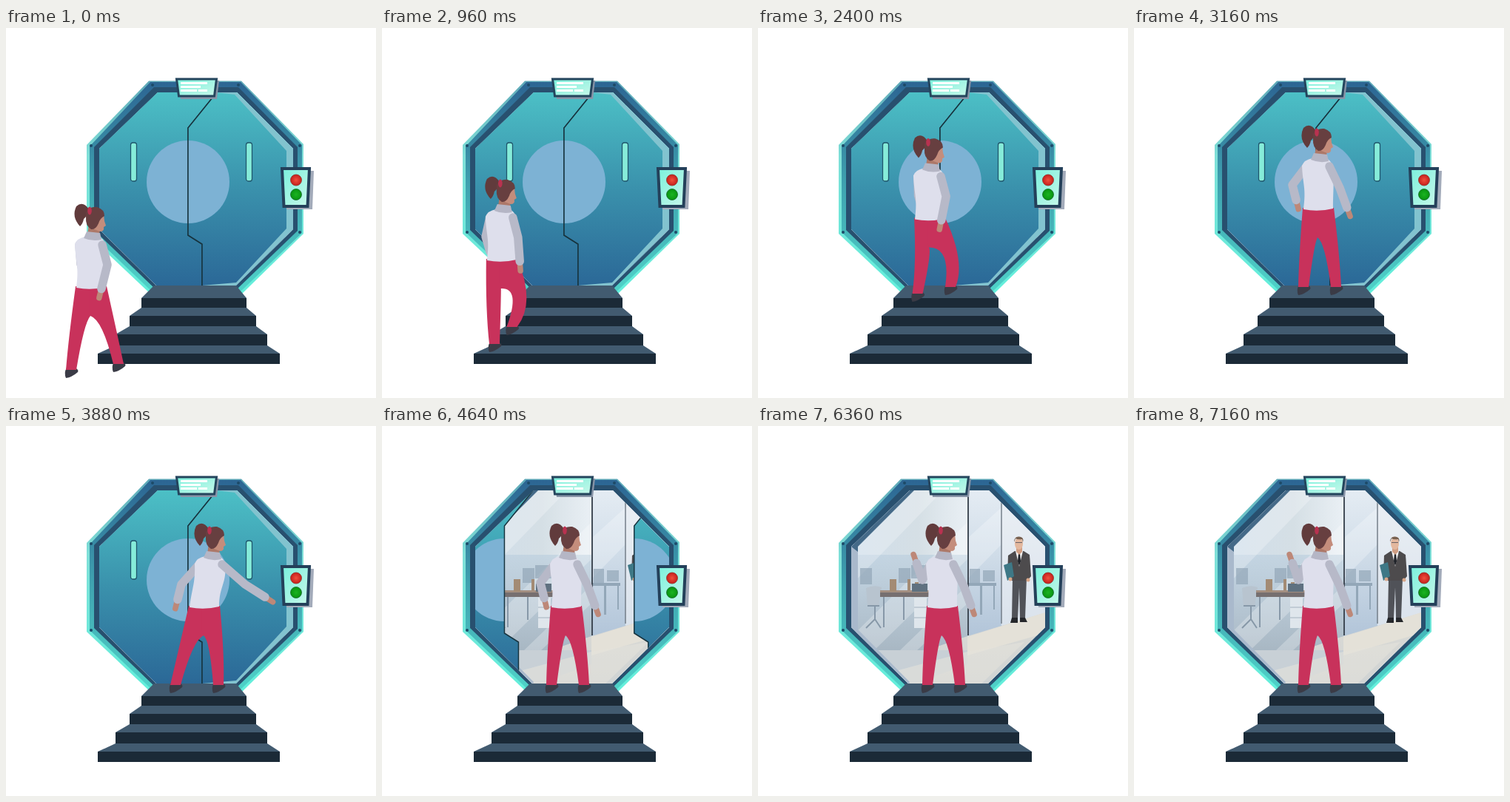
Recreate the animation shown at these times as an HTML page. Size 500 by 500 pixels, loop 7.2 s.

```html
<!DOCTYPE html>
<html lang="en">
<head>
<meta charset="utf-8">
<title>Office portal</title>
<style>
html, body { margin: 0; width: 100%; height: 100%; overflow: hidden; background: #fff; }
svg { display: block; width: 100%; height: 100%; }
</style>
</head>
<body>
<svg viewBox="0 0 500 500">
  <defs>
    <linearGradient id="doorFill" gradientUnits="userSpaceOnUse" x1="0" y1="86" x2="0" y2="348">
      <stop offset="0" stop-color="#4cc0c6"/><stop offset=".5" stop-color="#3a91ac"/><stop offset="1" stop-color="#2b6897"/>
    </linearGradient>
    <linearGradient id="rim" x1="0" y1="0" x2="0" y2="1">
      <stop offset="0" stop-color="#5fa9b8"/><stop offset=".35" stop-color="#7fe0d8"/><stop offset="1" stop-color="#62efdb"/>
    </linearGradient>
    <linearGradient id="band" x1="0" y1="0" x2="0" y2="1">
      <stop offset="0" stop-color="#2c6593"/><stop offset=".5" stop-color="#3fa3b0"/><stop offset="1" stop-color="#4fd2c8"/>
    </linearGradient>
    <linearGradient id="glow" x1="0" y1="0" x2="1" y2="1">
      <stop offset="0" stop-color="#7af0dc"/><stop offset="1" stop-color="#c9f8ea"/>
    </linearGradient>
    <linearGradient id="wall" x1="0" y1="0" x2="1" y2="0">
      <stop offset="0" stop-color="#cfdeeb"/><stop offset=".35" stop-color="#d5dfe5"/><stop offset=".6" stop-color="#eaf0f5"/>
    </linearGradient>
    <linearGradient id="haze" x1="0" y1="0" x2="0" y2="1">
      <stop offset="0" stop-color="#bdd0df" stop-opacity=".7"/><stop offset="1" stop-color="#a8b7c3"/>
    </linearGradient>
    <linearGradient id="glass" x1="0" y1="0" x2="0" y2="1">
      <stop offset="0" stop-color="#e6edf4"/><stop offset=".4" stop-color="#d3dfea"/><stop offset="1" stop-color="#b2c5d9"/>
    </linearGradient>
    <linearGradient id="floor" x1="0" y1="0" x2="0" y2="1">
      <stop offset="0" stop-color="#dcdbd5"/><stop offset="1" stop-color="#cfd3d4"/>
    </linearGradient>
    <radialGradient id="red"><stop offset="0" stop-color="#f0503c"/><stop offset="1" stop-color="#c61f1c"/></radialGradient>
    <radialGradient id="green"><stop offset="0" stop-color="#1bb422"/><stop offset="1" stop-color="#089410"/></radialGradient>
    <clipPath id="opening"><path d="M205 87H312L388 163V272L311 348H203L126 272V163Z"/></clipPath>
    <path id="seam" d="M290 80L284 88L246 135V280L265 292V355" fill="none" stroke="#17343f" stroke-width="1.5"/>
    <rect id="slot" y="155" width="8" height="52" rx="3" fill="#86ecd9" stroke="#1f566c" stroke-width="1.3"/>
    <path id="shoe" d="M-6-3L5-3Q11 0 9 3Q1 10-7 11Q-10 4-6-3Z" fill="#3a3b46"/>
    <path id="bolts" d="M198 77h0M115 159h0M115 276h0M314 77h0M397 159h0M397 276h0"/>
  </defs>

  <!-- portal frame -->
  <path d="M193 71.5H318L402 157V278L318 360H196L109 278V158Z" fill="url(#rim)"/>
  <path d="M195 73H317L400 158V277L316 357H198L113 276V160Z" fill="url(#band)"/>
  <path d="M200 80H314L394 161V274L313 352H201L119 273V161Z" fill="#28506f"/>
  <use href="#bolts" stroke="#1d4a68" stroke-width="4" stroke-linecap="round"/>

  <g clip-path="url(#opening)">
    <!-- office -->
    <rect x="120" y="80" width="275" height="275" fill="url(#wall)"/>
    <path d="M283 80H395V262L283 284Z" fill="url(#glass)"/>
    <path d="M329 80H395V262L329 270Z" fill="#eef2f6" opacity=".65"/>
    <rect x="126" y="174" width="157" height="130" fill="url(#haze)"/>
    <path d="M126 303H228L283 284L395 250V355H126Z" fill="url(#floor)"/>
    <path d="M126 303H283V322L205 350H126Z" fill="#c8d0d6"/>
    <path d="M283 285L388 252V280L283 310Z" fill="#e4e1d8"/>
    <path d="M190 330L283 305L360 292L300 350H190Z" fill="#e5e3dd" opacity=".6"/>
    <path d="M205 87H250L126 215V165ZM283 130V180L150 310H126V285ZM283 215V240L215 303H192ZM329 110V160L285 205V150Z" fill="#fff" opacity=".25"/>
    <g fill="#93a7b8">
      <path d="M138 192H154V214H138ZM190 192H206V212H190ZM207 188H229V206H207ZM286 193H300V212H286ZM304 195H320V210H304Z" opacity=".7"/>
      <path d="M284 212H322V216H284ZM300 216H303V255H300ZM318 216H320V248H318Z"/>
    </g>
    <path d="M146 219Q157 214 167 218L163 244H148Z" fill="#b8c4cf"/>
    <path d="M148 243H164M158 244V262M146 273L158 261L166 273M170 231V272M197 231V262" fill="none" stroke="#8798a8" stroke-width="2"/>
    <path d="M165 222H236V231H165Z" fill="#766f70"/>
    <path d="M165 222H236V225H165Z" fill="#a38f82"/>
    <path d="M178 207H187V224H178ZM202 207H206V222H202ZM212 211H217V222H212Z" fill="#a38b74"/>
    <path d="M208 213H229V224H208Z" fill="#5f7180"/>
    <path d="M211 232H228V273H211Z" fill="#dfe6ec"/>
    <path d="M211 245H228M211 259H228" stroke="#a4b2bf"/>
    <path d="M284 86V283" stroke="#343d48" stroke-width="1.8"/>
    <path d="M329 100V267" stroke="#6d7782" stroke-width="1.4"/>
    <path d="M126 155L135 163V275L205 346L203 350L126 274Z" fill="#a9b9cc"/>
    <path d="M126 163L205 87H211L135 163V170Z" fill="#456a88"/>

    <!-- colleague -->
    <path d="M344 205H363L361 260H354L353 218L351 260H343Z" fill="#505258"/>
    <path d="M343 259H351V266H341ZM354 259H361L364 265H354Z" fill="#25272b"/>
    <path d="M347 169L359 169L367 174L369 203L364 209H342L337 204L338 175Z" fill="#4d4b4d"/>
    <path d="M348 169H358L353 190Z" fill="#f4f4f4"/>
    <path d="M352 172H354L355 183L353 189L351 183Z" fill="#202329"/>
    <path d="M349 163H357V170L353 174L349 170Z" fill="#d09e83"/>
    <ellipse cx="352.5" cy="159" rx="5.5" ry="8" fill="#e3b89e"/>
    <path d="M346 157Q346 149 353 149.500Q360 150 358 157L357 153Q351 154 348 152Z" fill="#77604f"/>
    <path d="M348 157.500H357" stroke="#5d5a60" stroke-width=".9"/>
    <path d="M332 188L343 184L346 203L337 209Z" fill="#3e7886"/>
    <path d="M341 207h0M365 208h0" stroke="#d8a78a" stroke-width="5" stroke-linecap="round"/>

    <!-- sliding doors -->
    <g id="leftDoor">
      <path d="M90 80H290L284 88L246 135V280L265 292V355H90Z" fill="url(#doorFill)"/>
      <path d="M246 152A56 56 0 0 0 246 264Z" fill="#7db2d4"/>
      <use href="#slot" x="168.5"/>
      <use href="#seam"/>
    </g>
    <g id="rightDoor">
      <path d="M290 80L284 88L246 135V280L265 292V355H420V80Z" fill="url(#doorFill)"/>
      <path d="M246 152A56 56 0 0 1 246 264Z" fill="#7db2d4"/>
      <use href="#slot" x="324.5"/>
      <path d="M284 87H312L388 163V272L311 348H265L311 344L379 271V166L309 90Z" fill="#82c3cf"/>
      <use href="#seam"/>
    </g>
  </g>

  <!-- sign -->
  <path d="M233 71H288L285 96H236Z" fill="#8894a7"/>
  <path d="M230.5 69H284.500L281.500 92H233.500Z" fill="url(#glow)" stroke="#24455d" stroke-width="3"/>
  <path d="M236 74.500H272M236 79.500H263M236 84.500H258M260 84.500H272" stroke="#fff" stroke-width="3"/>

  <!-- control panel -->
  <path d="M377 193H416L414 245H379Z" fill="#a3abba"/>
  <path d="M373 190H410L407.500 241H375.500Z" fill="url(#glow)" stroke="#24405a" stroke-width="4"/>
  <circle cx="392" cy="205.500" r="7.500" fill="url(#red)" stroke="#8e3028" stroke-width=".8"/>
  <circle cx="392" cy="225" r="7.500" fill="url(#green)" stroke="#17682c" stroke-width=".8"/>

  <!-- stairs -->
  <path d="M200 348H311L325 365H183ZM183 378H325L338 389H167ZM167 403H338L353 414H148ZM148 429H353L370 440H124Z" fill="#425b70"/>
  <path d="M183 365H325V378H183ZM167 389H338V403H167ZM148 414H353V429H148ZM124 440H370V454H124Z" fill="#1b2a37"/>

  <!-- visitor -->
  <g stroke-linecap="round" stroke-linejoin="round">
    <path id="leftHand" stroke="#bd8878" stroke-width="7.5"/>
    <path id="leftArm" fill="none" stroke="#b7b9c8" stroke-width="11.5"/>
    <use id="leftShoe" href="#shoe"/>
    <use id="rightShoe" href="#shoe"/>
    <path id="leftLeg" fill="#c8325b"/>
    <path id="rightLeg" fill="#c8325b"/>
    <path id="torso" fill="#dedfec"/>
    <path id="rightHand" stroke="#bd8878" stroke-width="7.5"/>
    <path id="rightArm" fill="none" stroke="#b7b9c8" stroke-width="11.5"/>
    <g id="head">
      <path d="M-5-13L10-9L9 3L-7 1Z" fill="#ad7868"/>
      <path d="M-8-3L10-1L12 8Q0 11-12 6Z" fill="#b5b6c5"/>
      <path d="M3-24L15-26L16-17L18-11L15-9Q16-3 10-3L2-6Z" fill="#c48d7c"/>
      <path d="M-5-33Q-13-45-22-37Q-29-23-17-10Q-13-14-12-20Q-7-24-5-33Z" fill="#613b3c"/>
      <path d="M-9-29Q-4-37 6-36Q16-33 16-24Q10-21 8-14Q4-5-2-6Q-10-11-9-22Z" fill="#673f40"/>
      <ellipse cx="-4" cy="-31" rx="2.800" ry="5.500" fill="#b93250"/>
    </g>
  </g>
</svg>
<script>
const LOOP = 7200;
const STRIDE = 1080;   // one step of each foot
const SWING = 460;     // time a foot spends in the air
const WALK = 2750;

// Where each foot lands on the way up.
const footholds = {
  left: [[88, 462], [152, 427], [200, 378], [229, 350]],
  right: [[152, 454], [176, 404], [260, 350], [273, 350]]
};

// Elbow and wrist, measured from the neck.
const poses = {
  left: { walk: [-20, 41, -13, 65], stand: [-37, 40, -31, 64], reach: [-42, 42, -48, 66], wave: [-29, 36, -38, 10] },
  right: { walk: [20, 42, 17, 78], stand: [27, 44, 38, 74], reach: [44, 42, 74, 61] }
};

const $ = id => document.getElementById(id);
const ramp = (t, from, length) => Math.max(0, Math.min(1, (t - from) / length));
const ease = u => u * u * (3 - 2 * u);
const mix = (a, b, u) => a.map((v, i) => v + (b[i] - v) * u);
const move = (id, x, y) => $(id).setAttribute('transform', `translate(${x} ${y})`);
const trace = (id, d) => $(id).setAttribute('d', d);

function footAt(side, t) {
  const steps = footholds[side];
  const clock = t - (side === 'right' ? STRIDE / 2 : 0);
  const n = Math.floor(clock / STRIDE);
  if (n < 0) return steps[0];
  if (n > 2) return steps[3];
  const u = ramp(clock, n * STRIDE, SWING);
  const [x, y] = mix(steps[n], steps[n + 1], ease(u));
  return [x, y - 4 * Math.sin(Math.PI * u)];
}

// Quadratic segment from a to b whose middle passes through m.
function curveThrough(a, m, b) {
  const control = [0, 1].map(i => 2 * m[i] - (a[i] + b[i]) / 2);
  return `Q${control} ${b}`;
}

function drawLeg(side, pelvis, foot) {
  const [px, py] = pelvis, [fx, fy] = foot;
  const s = side === 'left' ? -1 : 1;
  const hip = [px + 11 * s, py + 10];
  const bend = 0.7 * Math.max(0, 95 - Math.hypot(fx - hip[0], fy - hip[1]));
  const knee = [(hip[0] + fx) / 2 + bend, (hip[1] + fy) / 2];
  const at = ([x, y], dx) => [x + dx * s, y];
  const waist = [px + 21 * s, py - 3], crotch = [px - 1, py + 37];
  trace(side + 'Leg',
    `M${waist}${curveThrough(waist, at(knee, 10), at(foot, 7))}L${at(foot, -7)}` +
    `${curveThrough(at(foot, -7), at(knee, -9), crotch)}L${px - 3 * s} ${py + 30}V${py - 3}Z`);
  move(side + 'Shoe', fx, fy);
}

function drawArm(side, neck, pose) {
  const [nx, ny] = neck;
  const shoulder = [nx + (side === 'left' ? -18 : 13), ny + 15];
  const elbow = [nx + pose[0], ny + pose[1]], wrist = [nx + pose[2], ny + pose[3]];
  const dx = wrist[0] - elbow[0], dy = wrist[1] - elbow[1], k = 9 / Math.hypot(dx, dy);
  trace(side + 'Arm', `M${shoulder}L${elbow}L${wrist[0] - dx * k * .4} ${wrist[1] - dy * k * .4}`);
  trace(side + 'Hand', `M${wrist}l${dx * k} ${dy * k}`);
}

function drawTorso([px, py], [nx, ny]) {
  trace('torso',
    `M${nx - 10} ${ny + 4}Q${nx - 21} ${ny + 6} ${nx - 24} ${ny + 14}` +
    `C${nx - 23} ${ny + 40} ${px - 16} ${py - 30} ${px - 20} ${py - 1}Q${px} ${py + 3} ${px + 20} ${py - 2}` +
    `C${px + 20} ${py - 30} ${nx + 20} ${ny + 40} ${nx + 17} ${ny + 14}Q${nx + 15} ${ny + 7} ${nx + 10} ${ny + 5}Z`);
}

function drawVisitor(t) {
  const climb = ramp(t, 0, WALK);
  const arrive = ease(ramp(t, 2350, 550));
  const reach = ease(ramp(t, 3160, 600)) * (1 - ease(ramp(t, 3880, 520)));
  const wave = ease(ramp(t, 4700, 600));
  const sway = Math.cos(Math.PI * t / STRIDE) * (1 - arrive);
  const waggle = 3 * wave * Math.sin((t - 5560) / 800 * 2 * Math.PI);

  const pelvis = mix([115, 352], [249, 246], climb);
  pelvis[0] += 19 * reach;
  const neck = [pelvis[0] + 2 + 9 * reach, pelvis[1] - 74];
  const rightFoot = footAt('right', t);

  drawLeg('left', pelvis, footAt('left', t));
  drawLeg('right', pelvis, [rightFoot[0] + 14 * reach, rightFoot[1]]);
  drawTorso(pelvis, neck);
  move('head', ...neck);

  const pose = side => mix(mix(poses[side].walk, poses[side].stand, arrive), poses[side].reach, reach);
  const left = mix(pose('left'), poses.left.wave, wave);
  const right = pose('right');
  left[0] += 4 * sway;
  left[2] += 4 * sway + waggle;
  right[2] -= 6 * sway;
  drawArm('left', neck, left);
  drawArm('right', neck, right);
}

function draw(t) {
  const open = ease(ramp(t, 3960, 1280));
  move('leftDoor', -147 * open, 0);
  move('rightDoor', 173 * open, 0);
  drawVisitor(t);
}

const start = performance.now();
function tick() {
  draw((performance.now() - start) % LOOP);
  requestAnimationFrame(tick);
}
tick();
</script>
</body>
</html>
```
